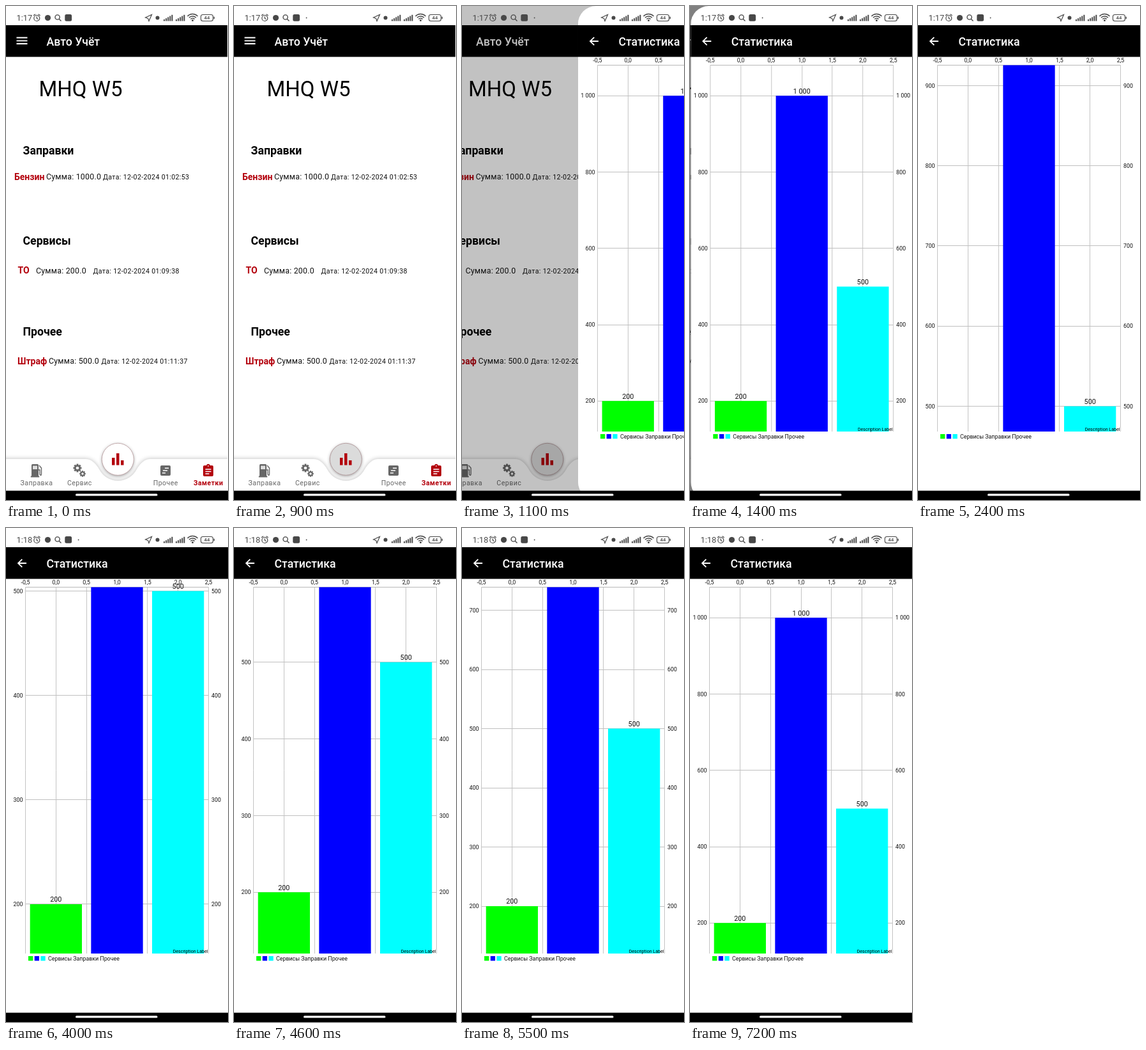
An HTML page with a canvas for the animation above (7600 ms loop, 348 by 772 pixels).

```html
<!DOCTYPE html>
<html lang="ru">
<head>
<meta charset="utf-8">
<title>Авто Учёт</title>
<style>
  html, body { margin: 0; width: 100%; height: 100%; overflow: hidden; background: #fff; }
  canvas { display: block; }
</style>
</head>
<body>
<canvas id="stage" width="348" height="772"></canvas>
<script>
const W = 348, H = 772, LOOP = 7600, STEP = 100;
const RED = '#b3000c', GREY = '#666', STATUS = '#484848';
const ctx = document.getElementById('stage').getContext('2d');

// Visible value range of the chart: [time, top value, bottom value]
const VIEW = [
  [1900, 1080, 120], [2400, 925.5, 468.4], [2700, 820, 450], [3400, 490, 150],
  [3900, 490, 150], [4000, 503.7, 152.8], [4200, 541, 120], [4300, 541, 120],
  [4600, 598, 120], [5200, 598, 120], [5500, 739, 120], [5700, 739, 120], [6000, 1080, 120]
];
const PLOT = { left: 30.5, right: 317.5, top: 92.5, bottom: 665 };
const BARS = [[200, '#0f0'], [1000, '#00f'], [500, '#0ff']];

// y is the middle of the capital letters
function text(str, x, y, size, { color = '#111', weight = 400, align = 'left', spacing = 0 } = {}) {
  ctx.font = `${weight} ${size}px Roboto, sans-serif`;
  ctx.letterSpacing = spacing + 'px';
  ctx.textAlign = align;
  ctx.fillStyle = color;
  ctx.fillText(str, x, y + size * 0.356);
}

function rect(x, y, w, h, color, r = 0) {
  ctx.fillStyle = color;
  ctx.beginPath();
  ctx.roundRect(x, y, w, h, r);
  ctx.fill();
}

function disc(x, y, r, color) {
  ctx.fillStyle = color;
  ctx.beginPath();
  ctx.arc(x, y, r, 0, 7);
  ctx.fill();
}

function stroke(path, color, width = 1) {
  ctx.strokeStyle = color;
  ctx.lineWidth = width;
  ctx.stroke(new Path2D(path));
}

function viewAt(t) {
  let i = VIEW.findIndex(key => key[0] > t);
  if (i < 0) return VIEW.at(-1).slice(1);
  if (i === 0) return VIEW[0].slice(1);
  const a = VIEW[i - 1], b = VIEW[i], k = (t - a[0]) / (b[0] - a[0]);
  return [1, 2].map(n => a[n] + (b[n] - a[n]) * k);
}

function header(title) {
  rect(0, 0, W, H, '#fff');
  rect(0, 30, W, 49.5, '#000');
  text(title, 63.5, 55.5, 17.7, { color: '#fff', weight: 500 });
}

function entry(y, kind, kindX, sum, sumX, date, dateX) {
  text(kind, kindX, y, 14, { color: RED, weight: 700 });
  text('Сумма: ' + sum, sumX, y, 12.4, { spacing: 0.22 });
  text('Дата: ' + date, dateX, y + 0.5, 10.6, { spacing: 0.35 });
}

function gear(x, y, r) {
  disc(x, y, r * 0.75, GREY);
  for (let i = 0; i < 4; i++) {
    ctx.save();
    ctx.translate(x, y);
    ctx.rotate(i * Math.PI / 4);
    rect(-r * 0.22, -r, r * 0.44, r * 2, GREY);
    ctx.restore();
  }
  disc(x, y, r * 0.36, '#fff');
}

function tabBar() {
  ctx.save();
  ctx.shadowColor = 'rgba(0,0,0,.28)';
  ctx.shadowBlur = 7;
  ctx.fillStyle = '#fff';
  ctx.fill(new Path2D('M-9 708H125Q137 708 146.4 724.5A33 33 0 0 0 204.6 724.5Q214 708 226 708H357V780H-9Z'));
  ctx.restore();

  // fuel pump
  rect(40, 716, 11, 20, GREY, 1.5);
  rect(42, 718.5, 7, 5.5, '#ddd');
  rect(38.8, 734.5, 13.4, 2, GREY);
  stroke('M51 725H53V732Q55.5 735 55.5 731V722L52 718', GREY, 1.4);

  gear(112, 722, 6.5);
  gear(120, 731, 4.8);

  // note
  rect(242, 718, 16, 16, GREY, 2);
  stroke('M249 722.3H255M246 726H253M245 729.8H250', '#fff', 1.6);

  // clipboard
  disc(317, 718.5, 2.8, RED);
  rect(309, 718, 16, 17, RED, 2);
  disc(317, 718.8, 0.9, '#fff');
  stroke('M312.5 724H321.5M312.5 727.5H321.5M312.5 731H318.5', '#fff', 1.5);

  const label = { align: 'center', spacing: 0.44, color: GREY };
  text('Заправка', 48, 745, 10.6, label);
  text('Сервис', 115.3, 745, 10.6, label);
  text('Прочее', 250.3, 745, 10.6, label);
  text('Заметки', 317.2, 745, 10.6, { ...label, color: RED, weight: 700 });
}

function actionButton(t) {
  ctx.save();
  ctx.shadowColor = 'rgba(0,0,0,.4)';
  ctx.shadowBlur = 5;
  ctx.shadowOffsetY = 1.5;
  disc(175.3, 708.3, 25, '#fff');
  ctx.restore();
  stroke('M150.3 708.3a25 25 0 1 0 50 0a25 25 0 1 0 -50 0', '#b99a9c', 0.8);
  if (t >= 900) disc(175.3, 708.3, 25, 'rgba(0,0,0,.14)');
  rect(166, 706, 4.5, 11.5, RED);
  rect(173, 699, 4.5, 18.5, RED);
  rect(180, 710, 4.5, 7.5, RED);
}

function drawHome(t) {
  header('Авто Учёт');
  stroke('M16.5 49.5H33.5M16.5 54.3H33.5M16.5 59H33.5', '#fff', 1.8);
  text('MHQ W5', 51.5, 129.5, 33, { color: '#000' });

  const title = { weight: 700, color: '#000' };
  text('Заправки', 26.5, 225.5, 17.7, title);
  text('Сервисы', 26.5, 367, 17.7, title);
  text('Прочее', 26.5, 508.5, 17.7, title);
  entry(267, 'Бензин', 13, '1000.0', 63, '12-02-2024 01:02:53', 152);
  entry(413.5, 'ТО', 18.5, '200.0', 47, '12-02-2024 01:09:38', 136.5);
  entry(555, 'Штраф', 18, '500.0', 67, '12-02-2024 01:11:37', 149.5);

  tabBar();
  actionButton(t);
}

function drawChart(t) {
  const [high, low] = viewAt(t);
  const { left, right, top, bottom } = PLOT;
  const column = (right - left) / 3;
  const yOf = value => top + (high - value) / (high - low) * (bottom - top);
  const format = value => value === 1000 ? '1 000' : String(value);

  for (let i = 0; i <= 6; i++) {
    const x = left + i * column / 2;
    stroke(`M${Math.floor(x) + 0.5} ${top}V${bottom}`, '#c4c4c4');
    text((i / 2 - 0.5).toFixed(1).replace('.', ','), x, 84.5, 8.86, { align: 'center' });
  }
  stroke(`M${left} ${top}H${right}`, '#b8b8b8');

  const interval = high - low > 900 ? 200 : 100;
  for (let v = Math.ceil(low / interval) * interval; v <= high; v += interval) {
    const y = yOf(v);
    stroke(`M${left} ${Math.floor(y) + 0.5}H${right}`, '#c0c0c0');
    text(format(v), 26.5, y, 8.86, { align: 'right' });
    text(format(v), 322, y, 8.86);
  }

  BARS.forEach(([value, color], i) => {
    const x = left + (i + 0.5) * column, y = yOf(value);
    const barTop = Math.max(top, y);
    if (barTop < bottom) rect(x - column * 0.425, barTop, column * 0.85, bottom - barTop, color);
    if (y >= top && y <= bottom) text(format(value), x, y - 7.5, 10.8, { align: 'center' });
    rect(35 + i * 9.7, 669, 7.3, 7.3, color);
  });
  text('Сервисы Заправки Прочее', 66, 673, 8.86);
  text('Description Label', 316.5, 661.2, 7.1, { align: 'right', color: '#000' });
}

function drawStats(t) {
  header('Статистика');
  stroke('M32 55H19.5M25.3 48.8L19 55L25.3 61.2', '#fff', 1.8);
  drawChart(t);
}

function drawStatus(t) {
  text(t < 3000 ? '1:17' : '1:18', 16.5, 18.7, 12.8, { color: STATUS });

  // alarm, app dot, search, app square
  stroke('M43.8 19a4.5 4.5 0 1 0 9 0a4.5 4.5 0 1 0 -9 0M48.3 16.3V19.3L50.3 20.5M43 15L46 12.7M50.6 12.7L53.6 15', STATUS, 1.2);
  disc(65.5, 18.5, 4.6, STATUS);
  stroke('M77 17.5a3.6 3.6 0 1 0 7.2 0a3.6 3.6 0 1 0 -7.2 0M83.2 20.2L86.5 23.5', STATUS, 1.4);
  rect(92.3, 13, 10.8, 10.8, STATUS, 2.5);
  if (t >= 100) disc(113.6, 18.5, 0.9, STATUS);

  stroke('M218.5 18L228.5 13.5L224 23.5L222.6 19.4Z', STATUS, 1.2);
  disc(237.5, 18.5, 3, STATUS);
  for (const x of [247, 266]) {
    for (let i = 0; i < 5; i++) {
      const h = 2.5 + i * 1.8;
      rect(x + i * 3.1, 23.5 - h, 2, h, STATUS);
    }
  }

  // wifi
  for (const r of [11, 7.6, 4.3]) {
    ctx.strokeStyle = STATUS;
    ctx.lineWidth = 1.5;
    ctx.beginPath();
    ctx.arc(292.5, 23.5, r, -Math.PI * 0.76, -Math.PI * 0.24);
    ctx.stroke();
  }
  disc(292.5, 22.5, 1.5, STATUS);

  ctx.strokeStyle = STATUS;
  ctx.lineWidth = 1.1;
  ctx.beginPath();
  ctx.roundRect(305.5, 13.5, 19, 10, 3);
  ctx.stroke();
  rect(325.5, 16.8, 1.5, 3.5, STATUS);
  text('44', 315, 18.6, 7.8, { color: STATUS, align: 'center', weight: 500 });
}

function draw(t) {
  // share of the screen the incoming page has still to cover
  const phase = Math.max(0, (t - 1022) * 0.0206);
  const remain = t >= 1600 ? 0 : (1 + phase) * Math.exp(-phase);

  if (remain > 0) {
    ctx.save();
    ctx.translate(-(1 - remain) * W / 4, 0);
    drawHome(t);
    ctx.restore();
    rect(W - (1 - remain) * W / 4 - 1, 0, W, H, '#fff');
    rect(0, 0, W, H, `rgba(0,0,0,${(1 - remain) * 0.5})`);
  }
  if (remain < 1) {
    ctx.save();
    ctx.translate(remain * W, 0);
    ctx.beginPath();
    ctx.roundRect(0, 0, W, H, remain > 0.001 ? [28, 0, 0, 28] : 0);
    ctx.clip();
    drawStats(t);
    ctx.restore();
  }
  drawStatus(t);
  rect(0, 757.5, W, 15, '#000');
  rect(109, 762.3, 128.5, 3.2, '#fff', 1.6);
}

function tick(now) {
  draw(Math.floor(now % LOOP / STEP) * STEP);
  requestAnimationFrame(tick);
}
tick(performance.now());
</script>
</body>
</html>
```
